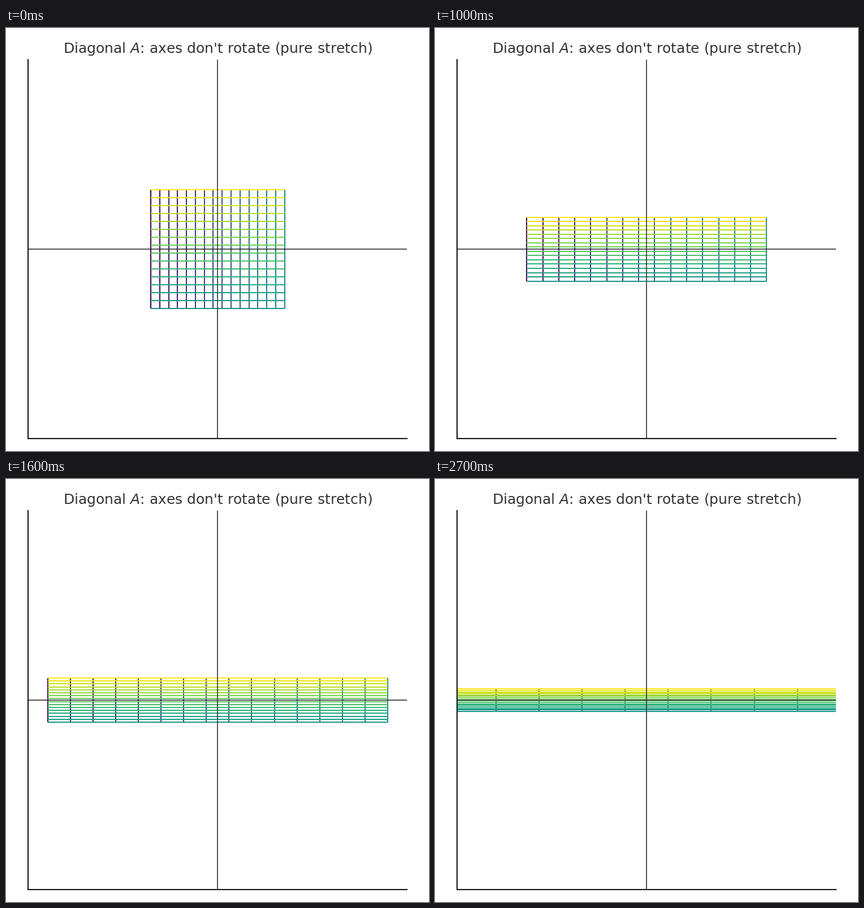
Write a matplotlib script that moves like this. It is 748 by 748 pixels and loops after 2.8 s.

```python
import numpy as np
import matplotlib.pyplot as plt
from matplotlib.animation import FuncAnimation
from matplotlib.collections import LineCollection

SIZE, DPI = 748, 150
FRAMES, INTERVAL = 28, 100
LINES = 16
GROWTH = np.array([1.06, 0.94])  # stretch per step along x and y
LEFT, BOTTOM, SIDE = 39.48, 22.05, 669.78

plt.rcParams["font.family"] = "DejaVu Sans"
plt.rcParams["mathtext.fontset"] = "dejavusans"

fig = plt.figure(figsize=((SIZE + 1e-4) / DPI, (SIZE + 1e-4) / DPI),
                 dpi=DPI, facecolor="white")
ax = fig.add_axes([LEFT / SIZE, BOTTOM / SIZE, SIDE / SIZE, SIDE / SIZE])
ax.set_xlim(-3, 3)
ax.set_ylim(-3, 3)
ax.set_xticks([])
ax.set_yticks([])
ax.spines[["top", "right"]].set_visible(False)
for side in ("left", "bottom"):
    ax.spines[side].set_linewidth(1.0)
    ax.spines[side].set_color("#151515")
ax.set_title("Diagonal $A$: axes don't rotate (pure stretch)",
             fontsize=12, color="#333333")

ax.axhline(0, color="#333333", lw=0.8)
ax.axvline(0, color="#333333", lw=0.8)

# Unit grid: vertical lines first, then horizontal ones on top
steps = np.linspace(-1, 1, LINES)
vertical = [[(s, -1), (s, 1)] for s in steps]
horizontal = [[(-1, s), (1, s)] for s in steps]
grid = np.array(vertical + horizontal)

colors = plt.get_cmap("viridis")(np.linspace(0, 1, 2 * LINES))
mesh = LineCollection(grid, colors=colors, linewidths=1.0, zorder=1)
ax.add_collection(mesh, autolim=False)


def update(frame):
    mesh.set_segments(grid * GROWTH ** (frame + 1))
    return (mesh,)


anim = FuncAnimation(fig, update, frames=FRAMES, interval=INTERVAL,
                     repeat=True, repeat_delay=0, blit=False)
plt.show()
```
